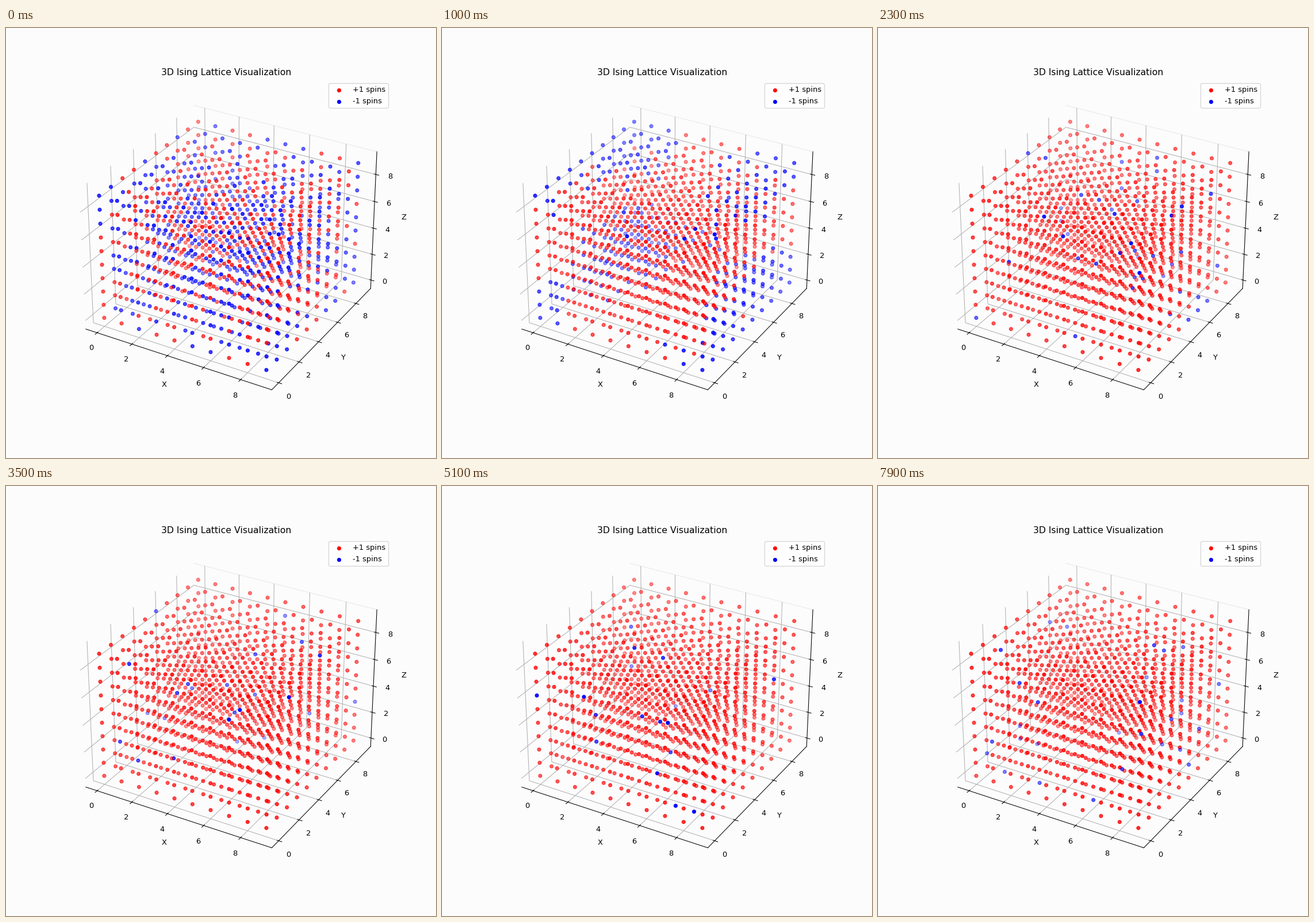
Recreate the animation shown at these times as a matplotlib script. Size 748x748 px, loop 8 s.

```python
import numpy as np
import matplotlib.pyplot as plt
from matplotlib.animation import FuncAnimation

N = 10
FRAMES = 80
TEMP = 3.1
ATTEMPT = 0.63   # share of sites visited in one sweep of random picks
BG = "#fcfcfc"

X, Y, Z = np.indices((N, N, N))
PARITY = (X + Y + Z) % 2


def wrapped(a, centre):
    """Distance along one periodic axis."""
    d = np.abs(a - centre)
    return np.minimum(d, N - d)


def drive(step):
    """Weak field: first shapes one minority droplet, then lets it melt."""
    if step > 10:
        return 0.2
    dist = np.sqrt(wrapped(X, 0) ** 2 + wrapped(Y, 6.5) ** 2
                   + wrapped(Z, 0.5) ** 2)
    return 0.9 * np.tanh((dist - 4.3) / 1.2)


def sweep(spins, field, rng):
    for side in (0, 1):
        around = sum(np.roll(spins, shift, axis)
                     for axis in range(3) for shift in (1, -1))
        cost = 2 * spins * (around + field)
        chance = ATTEMPT * np.exp(-np.maximum(cost, 0) / TEMP)
        flip = (PARITY == side) & (rng.random(spins.shape) < chance)
        spins = np.where(flip, -spins, spins)
    return spins


def simulate():
    rng = np.random.default_rng(7)
    states = [rng.choice([-1, 1], size=(N, N, N))]
    for step in range(1, FRAMES):
        states.append(sweep(states[-1], drive(step), rng))
    return states


states = simulate()

fig = plt.figure(figsize=(8, 8), dpi=93.5, facecolor=BG)
ax = fig.add_subplot(111, projection="3d", facecolor=BG)
ax.set_title("3D Ising Lattice Visualization")
ax.set_xlabel("X")
ax.set_ylabel("Y")
ax.set_zlabel("Z")

low, high = -0.65625, 9.65625
ax.set_xlim(low, high)
ax.set_ylim(low, high)
ax.set_zlim(low, high)
for axis in (ax.xaxis, ax.yaxis, ax.zaxis):
    axis.set_pane_color(BG)
ax.yaxis.pane.set_edgecolor("#ececec")

dots = []


def plot_spins(spins):
    for old in dots:
        old.remove()
    dots.clear()
    for value, color in ((1, "red"), (-1, "blue")):
        x, y, z = np.where(spins == value)
        dots.append(ax.scatter(x, y, z, c=color, label=f"{value:+d} spins"))


def update(i):
    plot_spins(states[i])
    return dots


plot_spins(states[0])
ax.legend(loc="upper right")

anim = FuncAnimation(fig, update, frames=FRAMES, interval=100,
                     repeat=True, repeat_delay=0, blit=False)
plt.show()
```
